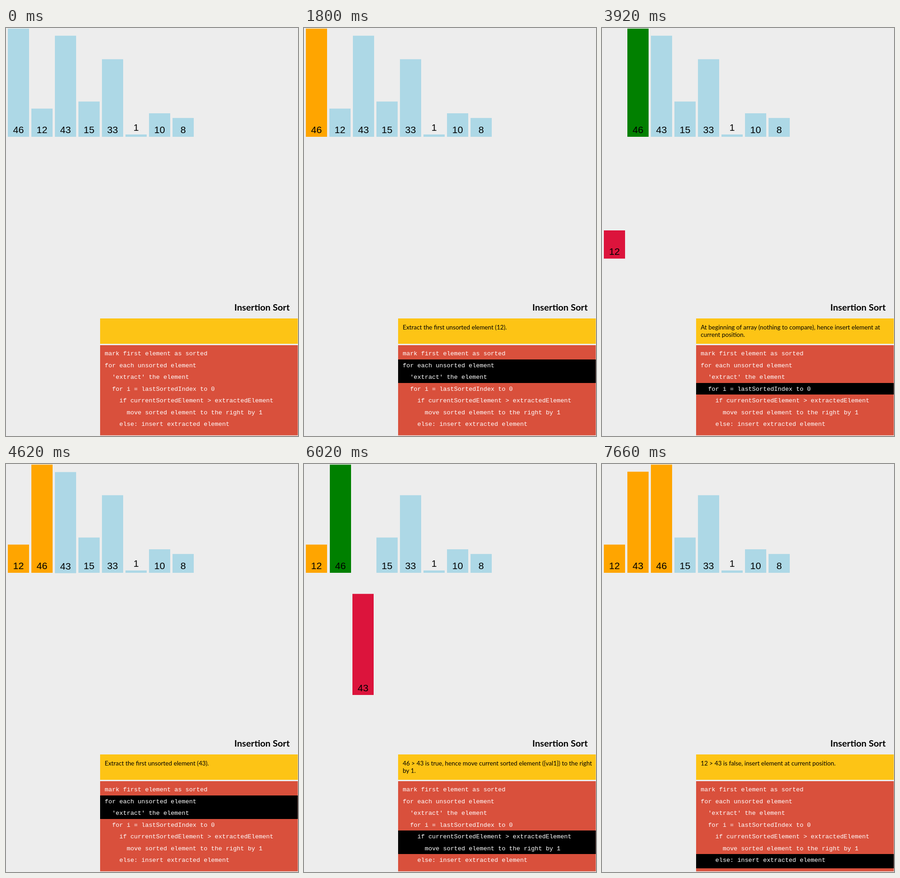
Write an HTML page that moves like this. It is 633 px wide and 885 px high and loops after 8 s.

```html
<!DOCTYPE html>
<html lang="en">
<head>
<meta charset="utf-8">
<title>Insertion Sort</title>
<style>
  html, body { margin: 0; width: 100%; height: 100%; overflow: hidden; background: #ededed; }
  svg { display: block; }
  .value { font: 21px "Liberation Sans", Arial, sans-serif; text-anchor: middle; }
  .title { font: bold 19.7px Lato, sans-serif; text-anchor: end; }
  .status { font: 13.3px Lato, sans-serif; }
  .code { font: 13.26px "Liberation Mono", "Courier New", monospace; fill: #fff; }
</style>
</head>
<body>
<svg id="stage" width="633" height="885" viewBox="0 0 633 885"></svg>
<script>
const LOOP = 8000;
const SLOT = 51, UNIT = 5.1, FLOOR = 236, DROP = 265;
const BLUE = [173, 216, 230], ORANGE = [255, 165, 0], GREEN = [0, 128, 0], RED = [220, 20, 60];
const VALUES = [46, 12, 43, 15, 33, 1, 10, 8];
const CODE = [
  [0, "mark first element as sorted"],
  [0, "for each unsorted element"],
  [2, "'extract' the element"],
  [2, "for i = lastSortedIndex to 0"],
  [4, "if currentSortedElement > extractedElement"],
  [6, "move sorted element to the right by 1"],
  [4, "else: insert extracted element"]
];

const compareWith = v => ["Figure where to insert extracted element; comparing with sorted", `element ${v}.`];
const extract = v => [`Extract the first unsorted element (${v}).`];
const shift = (a, b) => [`${a} > ${b} is true, hence move current sorted element ({val1}) to the right`, "by 1."];

// Each step redraws `count` times from `start` to `end`; `lead` is the progress at its first redraw.
const step = (start, end, count, lead, lines, status, changes) =>
  ({ start, end, count, lead, lines, status, changes });

const STEPS = [
  step(1190, 1350, 3, .43, [0, 0], ["Mark the first element (46) as sorted."],
    { 46: { color: ORANGE } }),
  step(1800, 2140, 5, 0, [1, 2], extract(12), { 12: { drop: 1, color: RED } }),
  step(2520, 2750, 3, 0, [3, 3], compareWith(46), { 46: { color: GREEN } }),
  step(3230, 3480, 4, .15, [4, 5], shift(46, 12), { 46: { slot: 1 }, 12: { slot: 0 } }),
  step(3920, 4170, 4, .09, [3, 3],
    ["At beginning of array (nothing to compare), hence insert element at", "current position."],
    { 12: { drop: 0, color: ORANGE }, 46: { color: ORANGE } }),
  step(4620, 4880, 4, .09, [1, 2], extract(43), { 43: { drop: 1, color: RED } }),
  step(5320, 5570, 4, .12, [3, 3], compareWith(46), { 46: { color: GREEN } }),
  step(6020, 6270, 4, .17, [4, 5], shift(46, 43), { 46: { slot: 2 }, 43: { slot: 1 } }),
  step(6740, 6900, 3, .43, [3, 3], compareWith(12), { 12: { color: GREEN }, 46: { color: ORANGE } }),
  step(7350, 7660, 5, 0, [6, 6], ["12 > 43 is false, insert element at current position."],
    { 43: { drop: 0, color: ORANGE }, 12: { color: ORANGE } })
];

const stage = document.getElementById("stage");

function add(tag, attrs, text = "", parent = stage) {
  const node = document.createElementNS("http://www.w3.org/2000/svg", tag);
  for (const name in attrs) node.setAttribute(name, attrs[name]);
  node.textContent = text;
  parent.append(node);
  return node;
}

const bars = VALUES.map(value => {
  const height = value * UNIT;
  const group = add("g", {});
  const rect = add("rect", { x: 0, y: FLOOR - height, width: 46, height }, "", group);
  add("text", { class: "value", x: 23, y: value === 1 ? 223 : 228 }, value, group);
  return { value, group, rect };
});

add("text", { class: "title", x: 615, y: 613 }, "Insertion Sort");
add("rect", { x: 204, y: 630, width: 428.5, height: 55, fill: "#fdc415" });
add("rect", { x: 204, y: 688, width: 428.5, height: 195.6, fill: "#d9503c" });
const highlight = add("rect", { x: 204, width: 428.5, fill: "#000" });
const statusLines = [653.5, 670.3].map(y => add("text", { class: "status", x: 214, y }));
CODE.forEach(([indent, text], i) =>
  add("text", { class: "code", x: 214 + indent * 7.956, y: 710 + i * 25.5 }, text));

const ease = u => u < .5 ? 4 * u ** 3 : 1 - 4 * (1 - u) ** 3;
const mix = (a, b, p) => Array.isArray(a) ? a.map((v, i) => mix(v, b[i], p)) : a + (b - a) * p;
const lineTop = i => i ? Math.round(718.7 + 25.5 * (i - 1)) : 688;
const lineBottom = i => i === 6 ? 877 : lineTop(i + 1);

function progress({ start, end, count, lead }, t) {
  const redraw = Math.min(count - 1, Math.floor((t - start) / (end - start) * (count - 1) + 1e-6));
  return ease(lead + (1 - lead) * redraw / (count - 1));
}

function draw(t) {
  const state = {};
  VALUES.forEach((value, slot) => state[value] = { slot, drop: 0, color: BLUE });

  const begun = STEPS.filter(s => t >= s.start);
  for (const s of begun) {
    const p = progress(s, t);
    for (const value in s.changes)
      for (const key in s.changes[value])
        state[value][key] = mix(state[value][key], s.changes[value][key], p);
  }

  for (const { value, group, rect } of bars) {
    const { slot, drop, color } = state[value];
    group.setAttribute("transform", `translate(${4 + slot * SLOT} ${drop * DROP})`);
    rect.setAttribute("fill", `rgb(${color.map(Math.round)})`);
  }

  const current = begun[begun.length - 1];
  statusLines.forEach((node, i) => node.textContent = current && current.status[i] || "");
  const [first, last] = current ? current.lines : [0, 0];
  highlight.setAttribute("y", lineTop(first));
  highlight.setAttribute("height", current ? lineBottom(last) - lineTop(first) : 0);
}

const origin = performance.now();
function tick() {
  draw((performance.now() - origin) % LOOP);
  requestAnimationFrame(tick);
}
tick();
</script>
</body>
</html>
```
